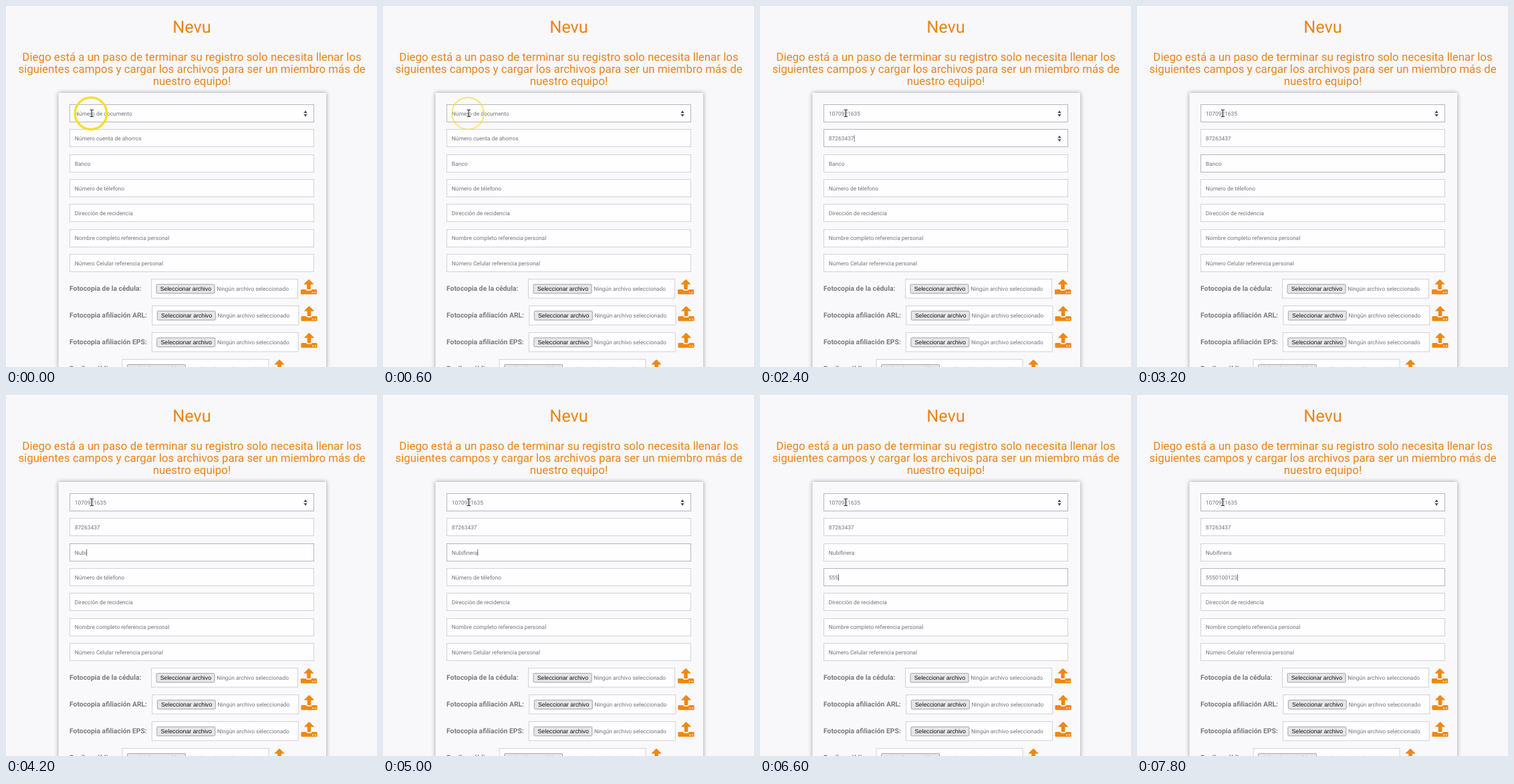
An HTML page for the animation above (8000 ms loop, 555 by 540 pixels).

```html
<!DOCTYPE html>
<html lang="es">
<head>
<meta charset="utf-8">
<title>Registro</title>
<style>
  html, body { margin: 0; width: 100%; height: 100%; overflow: hidden; background: #f8f7fa; }
  svg { display: block; text-rendering: geometricPrecision; font-family: Roboto, sans-serif; }
  .heading { fill: #e9851a; text-anchor: middle; }
  .card { fill: #f9f8fb; filter: drop-shadow(0 0 3px rgba(0, 0, 0, .38)); }
  .box { fill: #fefdff; stroke: #d2d1d4; }
  .box.active { stroke: #b6b5b8; }
  .small { font-size: 8.42px; fill: #757577; }
  .label { font-size: 10.36px; font-weight: 700; fill: #7b7a7d; }
  .button { fill: #e6e5e7; stroke: #a3a2a6; }
  .button-text { font: 8.75px "Liberation Sans", Arial, sans-serif; fill: #111; }
  .icon { fill: #ee8812; }
</style>
</head>
<body>
<svg id="stage" width="555" height="540" viewBox="0 0 555 540"></svg>
<script>
const LOOP = 8000, STEP = 200;
const stage = document.getElementById('stage');

function add(tag, attrs, text) {
  const node = document.createElementNS('http://www.w3.org/2000/svg', tag);
  for (const key in attrs) node.setAttribute(key, attrs[key]);
  if (text) node.textContent = text;
  stage.append(node);
  return node;
}
const label = (cls, x, y, text, size) =>
  add('text', size ? { class: cls, x, y, 'font-size': size } : { class: cls, x, y }, text);
const rect = (cls, x, y, width, height, rx = 0) => add('rect', { class: cls, x, y, width, height, rx });

// counts: characters present at each step after `start`
const fields = [
  { hint: 'Número de documento', value: '1070921635', focus: 800, start: 800, counts: [5, 10], spinner: true },
  { hint: 'Número cuenta de ahorros', value: '87263437', focus: 1200, start: 2000, counts: [3, 6, 8], spinner: true },
  { hint: 'Banco', value: 'Nubifinera', focus: 2600, start: 3400, counts: [1, 2, 3, 3, 4, 5, 7, 8, 10] },
  { hint: 'Número de télefono', value: '5550100123', focus: 5200, start: 6200, counts: [1, 2, 3, 4, 5, 6, 7, 8, 10] },
  { hint: 'Dirección de recidencia' },
  { hint: 'Nombre completo referencia personal' },
  { hint: 'Número Celular referencia personal' }
];
const uploads = [
  { text: 'Fotocopia de la cédula:', x: 217.5, iconX: 453 },
  { text: 'Fotocopia afiliación ARL:', x: 218.8, iconX: 453.5 },
  { text: 'Fotocopia afiliación EPS:', x: 218.3, iconX: 453.5 },
  { text: 'Recibo público:', x: 174, iconX: 409 }
];

label('heading', 278, 40, 'Nevu', 25.3);
['Diego está a un paso de terminar su registro solo necesita llenar los',
 'siguientes campos y cargar los archivos para ser un miembro más de',
 'nuestro equipo!'].forEach((line, i) => label('heading', 278, 81.7 + i * 18.3, line, 16.89));

rect('card', 78.5, 130, 400.5, 430);

fields.forEach((field, i) => {
  const mid = 161 + i * 37.3;
  field.mid = mid;
  field.box = rect('box', 95.5, Math.round(mid - 13) - .5, 365, 26);
  field.label = label('small', 102.8, mid + 2.9, field.hint);
  if (field.spinner) {
    field.arrows = add('path', {
      d: `M445.6 ${mid - 1}h4.8l-2.4 -3.4zM445.6 ${mid + 1}h4.8l-2.4 3.4z`,
      fill: '#444', stroke: '#ecebee', 'stroke-width': 2, 'paint-order': 'stroke'
    });
  }
});

uploads.forEach(({ text, x, iconX }, i) => {
  const top = 409 + i * 40;
  label('label', 95, top + 17.3, text);
  rect('box', x, top - .5, 219, 28.5);
  rect('button', x + 7.5, top + 7.3, 87, 13.6, 1.5);
  label('button-text', x + 13.2, top + 17.1, 'Seleccionar archivo');
  label('small', x + 97.7, top + 17, 'Ningún archivo seleccionado');
  add('path', {
    class: 'icon', transform: `translate(${iconX} ${top}) scale(.93)`, 'fill-rule': 'evenodd',
    d: 'M-.7 .2Q0-.4 .7 .2L7.7 7.2Q8.3 8 7 8H3V15Q3 16 2 16H-2Q-3 16-3 15V8H-7Q-8.3 8-7.7 7.2Z' +
       'M-11.5 16H-4.8Q-4 18-2 18H2Q4 18 4.8 16H11.5Q13 16 13 17.5V22.5Q13 24 11.5 24H-11.5Q-13 24-13 22.5V17.5Q-13 16-11.5 16Z' +
       'M5 21a1 1 0 1 0 2 0a1 1 0 1 0-2 0zM9 21a1 1 0 1 0 2 0a1 1 0 1 0-2 0z'
  });
});

const caret = add('rect', { width: .9, height: 10, fill: '#666' });
const ring = add('circle', { cx: 127, cy: 160.7, r: 23.8, fill: 'none', stroke: '#f3e02c' });
const beam = 'M125.5 155.5H127.5L128.2 156L129 155.5H131M128.2 156V165M125.5 165.5H127.5L128.2 165L129 165.5H131';
add('path', { d: beam, fill: 'none', stroke: '#fff', 'stroke-width': 2.4, 'stroke-opacity': .7 });
add('path', { d: beam, fill: 'none', stroke: '#222', 'stroke-width': 1.1 });

function typedCount({ start, counts }, t) {
  if (!counts || t < start) return 0;
  return counts[Math.min((t - start) / STEP, counts.length - 1)];
}

function draw(t) {
  const focused = fields.findLast(f => f.focus <= t);
  fields.forEach((field, i) => {
    const count = typedCount(field, t);
    field.label.textContent = count ? field.value.slice(0, count) : field.hint;
    const active = i === 0 || field === focused;
    field.box.classList.toggle('active', active);
    if (field.arrows) field.arrows.style.display = active ? '' : 'none';
  });

  let caretOn = false;
  if (focused) {
    const count = typedCount(focused, t);
    const lastKey = focused.start + (focused.counts.length - 1) * STEP;
    const since = t - (count ? Math.min(t, lastKey) : focused.focus);
    caretOn = since % 1000 < 600;
    caret.setAttribute('x', 102.9 + (count ? focused.label.getComputedTextLength() : 0));
    caret.setAttribute('y', focused.mid - 5);
  }
  caret.style.display = caretOn ? '' : 'none';

  const strength = Math.max(0, 1 - t / 1100);
  ring.setAttribute('stroke-width', 1.2 + 2.2 * strength);
  ring.setAttribute('opacity', t < 1000 ? Math.min(1, strength * 1.35) : 0);
}

function tick() {
  draw(Math.floor(performance.now() % LOOP / STEP) * STEP);
  requestAnimationFrame(tick);
}
tick();
</script>
</body>
</html>
```
